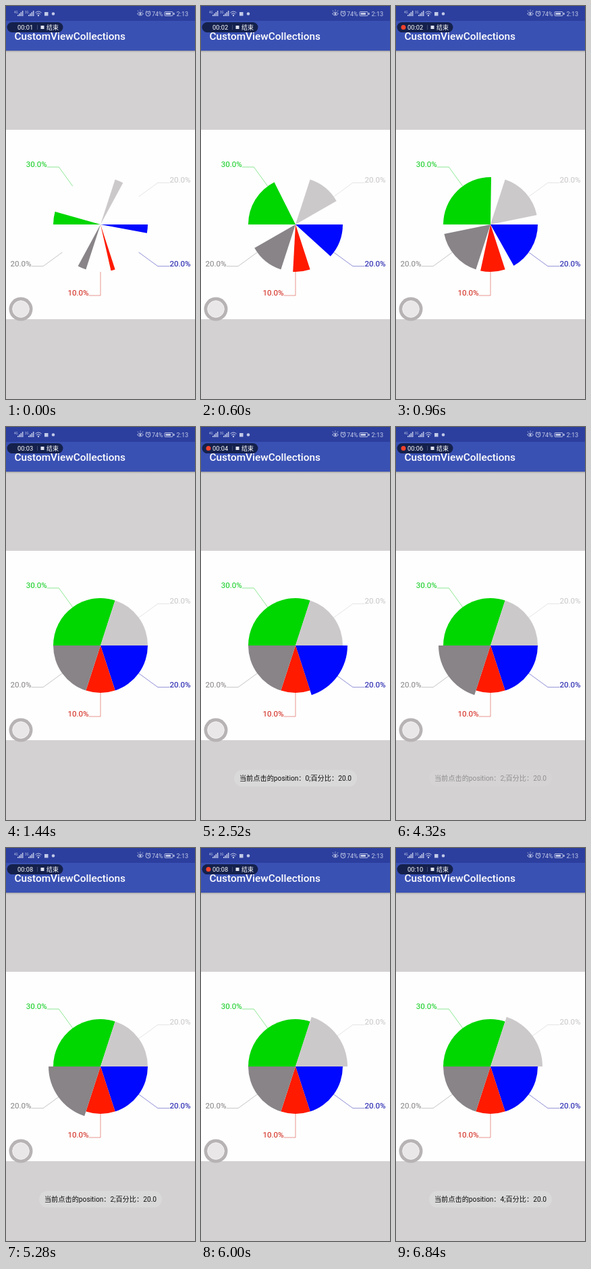
Animation of 280 by 581 pixels, one loop 7200 ms. Source, as an HTML page:

```html
<!DOCTYPE html>
<html lang="zh">
<head>
<meta charset="utf-8">
<title>CustomViewCollections</title>
<style>
  html, body { margin: 0; width: 100%; height: 100%; overflow: hidden; background: #d3d1d2; }
  svg { display: block; width: 280px; height: 581px; font-family: Roboto, 'Noto Sans CJK SC', 'Noto Sans CJK', sans-serif; }
</style>
</head>
<body>
<svg viewBox="0 0 280 581">
  <defs>
    <linearGradient id="shade" x2="0" y2="1">
      <stop stop-color="#888" stop-opacity=".7"/>
      <stop offset="1" stop-color="#aaa" stop-opacity="0"/>
    </linearGradient>
  </defs>
  <rect width="280" height="581" fill="#d3d1d2"/>
  <rect y="66" width="280" height="3" fill="url(#shade)"/>
  <rect y="183" width="280" height="280" fill="#fefefe"/>
  <rect width="280" height="66" fill="#3a51b4"/>
  <rect width="280" height="22" fill="#2c3f9e"/>

  <!-- status bar -->
  <g fill="#c3cae8" font-size="9">
    <text x="12" y="10.5" font-size="4.5">4G</text>
    <text x="28" y="10.5" font-size="4.5">3G</text>
    <path id="bars" d="M17 15v-2h1.5v2zM19.3 15v-4h1.5v4zM21.6 15v-6h1.5v6zM23.9 15v-8h1.5v8z"/>
    <use href="#bars" x="16"/>
    <g fill="none" stroke="#c3cae8">
      <path d="M43.5 10q4.5-4 9 0M45 12q3-2.6 6 0"/>
      <path d="M194.500 11.500q4.500-5 9 0q-4.500 5-9 0M196 8l-1-1.300M199 7v-1.500M202 8l1-1.300" stroke-width=".9"/>
      <circle cx="210.500" cy="11.500" r="3.400"/>
      <path d="M210.500 9.500v2.200h1.700M206.700 8.800l2-1.700M214.300 8.800l-2-1.700" stroke-width=".9"/>
      <rect x="235" y="8.500" width="12" height="6" rx="1" stroke-width=".9"/>
    </g>
    <circle cx="48" cy="14" r="1.200"/>
    <circle cx="199" cy="11.500" r="1.500"/>
    <rect x="57" y="9" width="5.500" height="5.500"/>
    <circle cx="70" cy="11.500" r="2.300"/>
    <path d="M236.500 10h7.500v3h-7.500zM248 10h1.500v3h-1.500z"/>
    <text x="216" y="14.500">74%</text>
    <text x="252.500" y="14.500" font-size="9.200">2:13</text>
  </g>

  <text x="12.500" y="50" font-size="15.400" font-weight="500" fill="#fff">CustomViewCollections</text>

  <!-- recorder -->
  <rect x="1.500" y="24" width="83" height="15" rx="7.500" fill="#15214c"/>
  <circle id="dot" cx="11" cy="31.500" r="3.500" fill="#f4432c"/>
  <g fill="#fff" font-size="9.300">
    <text id="clock" x="17" y="35"></text>
    <rect x="46" y="28" width=".7" height="7" fill="#56608a"/>
    <rect x="51.500" y="29" width="5" height="5" fill="#dfe2ee"/>
    <text x="60" y="35" font-size="9">结束</text>
  </g>

  <g id="chart"></g>

  <circle cx="22" cy="448" r="17.500" fill="#b7b3b5"/>
  <circle cx="22" cy="448" r="12.300" fill="#e9e7e8" stroke="#f5f3f4" stroke-width="1"/>

  <g id="toast">
    <rect x="49" y="507" width="182" height="24.500" rx="12.200" fill="#dad9da"/>
    <text id="message" x="140" y="523" font-size="10.200" text-anchor="middle" fill="#111"></text>
  </g>
</svg>
<script>
const LOOP = 7200, STEP = 120, CX = 140, CY = 323, R = 70;
const $ = id => document.getElementById(id);
const clamp = v => Math.max(0, Math.min(1, v));

const slices = [
  { pct: 20, fill: '#0008ff', ink: '#0c0ca8' },
  { pct: 10, fill: '#ff1a00', ink: '#d01c10' },
  { pct: 20, fill: '#888487', ink: '#858184' },
  { pct: 30, fill: '#00d600', ink: '#08cc18' },
  { pct: 20, fill: '#ccc9cb', ink: '#c8c5c7' }
];
// each tap enlarges one slice and shows a toast
const taps = [
  { at: 2160, fade: 3860, gone: 4080, pos: 0 },
  { at: 4200, fade: 6000, gone: 6000, pos: 2 },
  { at: 6000, fade: 9000, gone: 9000, pos: 4 }
];

function add(tag, attrs, text = '') {
  const el = document.createElementNS('http://www.w3.org/2000/svg', tag);
  for (const k in attrs) el.setAttribute(k, attrs[k]);
  el.textContent = text;
  return $('chart').appendChild(el);
}

function point(deg, r) {
  const a = deg * Math.PI / 180;
  return [CX + r * Math.cos(a), CY + r * Math.sin(a)];
}

let angle = 0;
for (const s of slices) {
  s.start = angle;
  s.sweep = s.pct * 3.6;
  angle += s.sweep;
  const mid = s.start + s.sweep / 2;
  const [x, y] = point(mid, R * 1.5);
  const right = x > CX + 1;
  const end = x + (right ? R : -R) / 4;
  add('path', { d: `M${point(mid, R)}L${x},${y}H${end}`, fill: 'none', stroke: s.ink, 'stroke-width': .7, opacity: .65 });
  add('text', { x: end, y, fill: s.ink, 'font-size': 11.6, 'text-anchor': right ? 'start' : 'end' }, s.pct + '.0%');
}
for (const s of slices) s.path = add('path', { fill: s.fill });

function draw(t) {
  const grow = (1 - Math.cos(Math.PI * clamp((t + 488) / 1960))) / 2;
  const tap = taps.filter(p => t >= p.at).pop();

  slices.forEach((s, i) => {
    const r = tap && tap.pos === i ? R * 1.1 : R;
    s.path.setAttribute('d',
      `M${CX},${CY}L${point(s.start, r)}A${r},${r} 0 0 1 ${point(s.start + s.sweep * grow, r)}Z`);
  });

  let alpha = 0;
  if (tap) {
    if (t < tap.gone) alpha = Math.min(clamp((t - tap.at) / 360), Math.max(.08, (tap.fade - t) / 240));
    $('message').textContent = `当前点击的position：${tap.pos};百分比：${slices[tap.pos].pct}.0`;
  }
  $('toast').setAttribute('opacity', alpha);

  // the recorded clock runs a quarter faster than playback
  const sec = 1.499 + t / 800;
  $('clock').textContent = '00:' + String(Math.floor(sec)).padStart(2, '0');
  $('dot').setAttribute('opacity', sec % 1 >= .5 ? 1 : 0);
}

function tick() {
  draw(Math.floor(performance.now() % LOOP / STEP) * STEP);
  requestAnimationFrame(tick);
}
tick();
</script>
</body>
</html>
```
